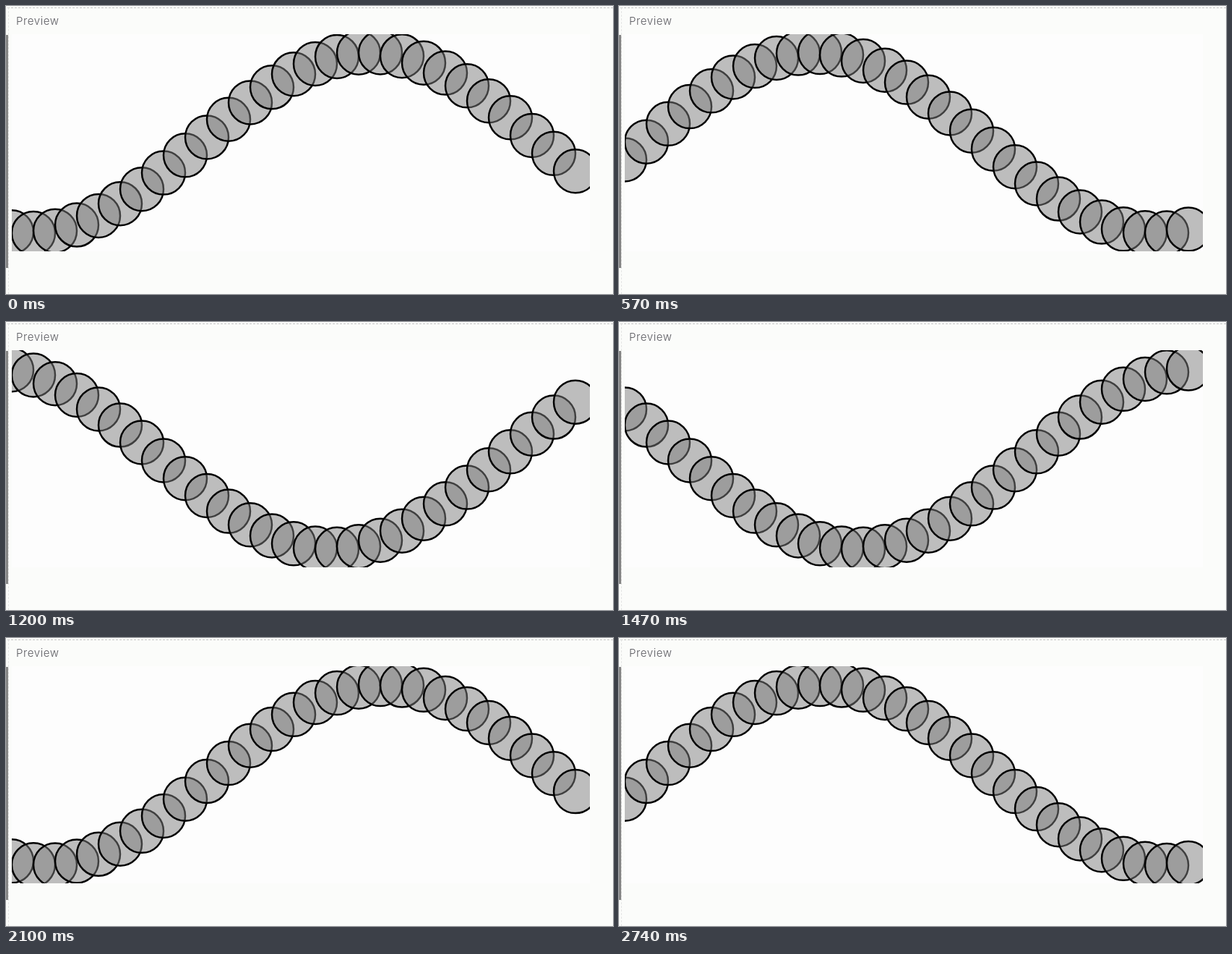
Recreate the animation shown at these times as an HTML page with a canvas. Size 840 px wide and 398 px high, loop 2780 ms.

```html
<!DOCTYPE html>
<html lang="en">
<meta charset="utf-8">
<title>Wave preview</title>
<style>
  html, body { margin: 0; width: 100%; height: 100%; overflow: hidden; background: #fbfcfa; }
  div, canvas { position: absolute; }
  .top { left: 2px; right: 0; top: 2px; border-top: 1px dashed #c4c4c4; }
  .side { left: 3px; top: 2px; bottom: 0; border-left: 1px dashed #e4e4e4; }
  .bar { left: 0; top: 40px; width: 3px; height: 322px; background: #868686; }
  .label { left: 14px; top: 12px; font: 300 15px/18px Inter, sans-serif; letter-spacing: .6px; color: #5c5c62; }
  canvas { left: 8px; top: 39px; background: #fdfdfd; }
</style>
<div class="top"></div>
<div class="side"></div>
<div class="bar"></div>
<div class="label">Preview</div>
<canvas width="800" height="300"></canvas>
<script>
const ctx = document.querySelector('canvas').getContext('2d');
const LOOP = 2780, STEP = 0.05;
// [tick, phase steps travelled]; the wave runs slightly unevenly
const pace = [[0, 0], [9, 16], [25, 46], [36, 70], [54, 106], [63, 123], [82, 155]];

function phaseAt(tick) {
  const i = Math.max(1, pace.findIndex(p => p[0] >= tick));
  const [t0, s0] = pace[i - 1], [t1, s1] = pace[i];
  const steps = Math.round(s0 + (s1 - s0) * (tick - t0) / (t1 - t0));
  return 3.31 - steps * STEP;
}

function draw(phase) {
  ctx.clearRect(0, 0, 800, 300);
  ctx.lineWidth = 2.5;
  ctx.fillStyle = 'rgba(127,127,127,.5)';
  for (let i = 0; i < 27; i++) {
    ctx.beginPath();
    ctx.arc(i * 30, 150 - 125 * Math.cos(i * 0.2 - phase), 30, 0, 2 * Math.PI);
    ctx.fill();
    ctx.stroke();
  }
}

const start = performance.now();
function frame() {
  const t = (performance.now() - start) % LOOP;
  const tick = Math.floor(Math.floor(t / 10) * 0.3 + 1e-6);
  draw(phaseAt(Math.min(tick, 82)));
  requestAnimationFrame(frame);
}
frame();
</script>
</html>
```
